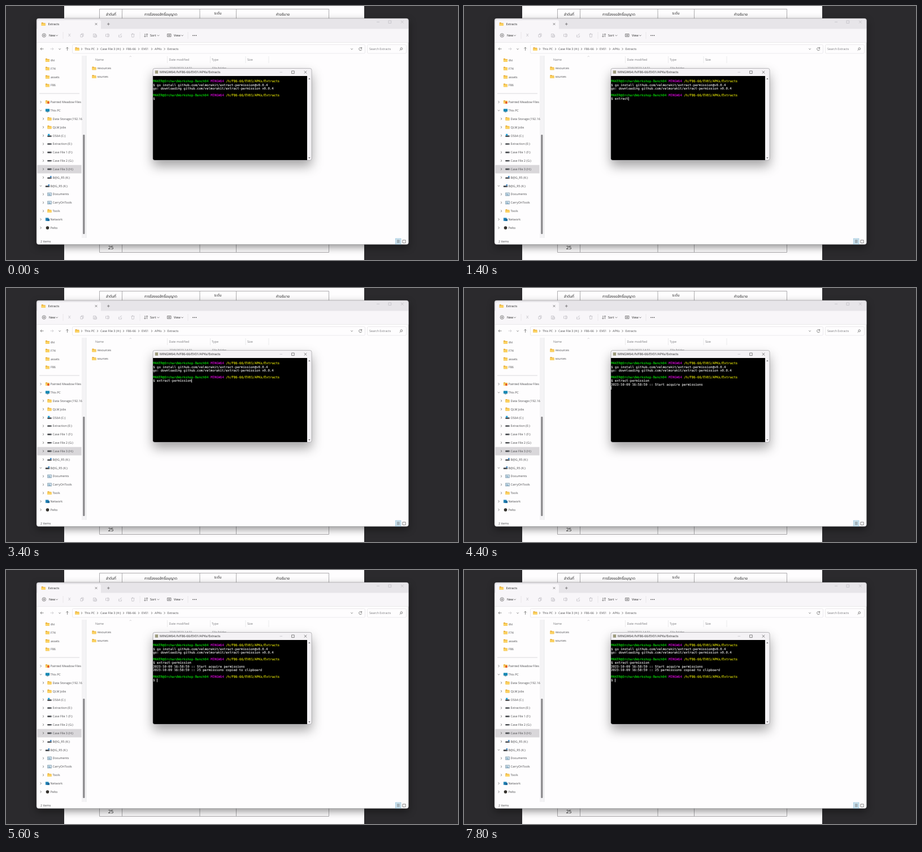
Animation, 800 px wide and 450 px high, one loop 8 s. Source, as an HTML page:

```html
<!DOCTYPE html>
<html lang="en">
<head>
<meta charset="utf-8">
<title>Terminal session</title>
<style>
  html, body { margin: 0; width: 100%; height: 100%; overflow: hidden; background: #2b2a2d; }
  svg { display: block; width: 800px; height: 450px; }
  text { font: 5.4px "Open Sans", "Noto Sans", sans-serif; fill: #4a4a4d; white-space: pre; text-rendering: geometricPrecision; }
  .soft { fill: #77777b; }
  .dark { fill: #222; }
  .title { font-size: 5.7px; }
  .thai { font: 6.4px "Noto Sans Thai", "Noto Sans", "DejaVu Sans", sans-serif; fill: #222; text-anchor: middle; }
  .number { font-size: 8.4px; }
  .term text { font: 5.648px "DejaVu Sans Mono", monospace; fill: currentColor; stroke: currentColor; stroke-width: .12; }
  .line { fill: none; stroke: #555; stroke-width: .7; }
  .faint { fill: none; stroke: #bcbbc0; stroke-width: .7; }
  .rule { fill: none; stroke: #e6e5e8; stroke-width: .8; }
  .table { fill: none; stroke: #98979a; stroke-width: .8; }
  .explorer { filter: drop-shadow(0 5px 7px rgba(0, 0, 0, .42)); }
  .console { filter: drop-shadow(0 10px 10px rgba(0, 0, 0, .36)); }
</style>
</head>
<body>
<svg viewBox="0 0 800 450">
  <defs>
    <g id="folder">
      <path d="M-3.6-2.4q0-.6.6-.6h2l.9.9h3q.6 0 .6.6V2.2q0 .6-.6.6H-3q-.6 0-.6-.6z" fill="#e6a92e"/>
      <rect x="-3.6" y="-1.3" width="7.2" height="4.1" rx=".6" fill="#fbd263"/>
    </g>
    <g id="drive">
      <rect x="-3.7" y="-1.2" width="7.4" height="2.6" rx=".6" fill="#4b4d51"/>
      <rect x="1.6" y="0" width="1.2" height=".7" fill="#b9c4c8"/>
    </g>
    <g id="usb">
      <use href="#drive" y=".8"/>
      <rect x="1" y="-2.6" width="2.6" height="2.4" fill="#3d86c4"/>
    </g>
    <g id="system">
      <use href="#drive" y=".9"/>
      <rect x="-3" y="-2.9" width="3.4" height="2.8" fill="#27a4d8"/>
    </g>
    <g id="pc">
      <rect x="-3.6" y="-2.8" width="7.2" height="4.8" rx=".5" fill="#1689b4"/>
      <path d="M-1.8 2.8h3.6" stroke="#3f6473" stroke-width=".9"/>
    </g>
    <g id="net">
      <rect x="-3.6" y="-2.8" width="5.6" height="5.4" fill="#2586b8"/>
      <rect x="-1" y="-1" width="4.6" height="3.8" fill="#1d6a9c"/>
    </g>
    <g id="docs">
      <rect x="-3.3" y="-2.5" width="6.600" height="5" fill="#dce9f1" stroke="#6f8ea2" stroke-width=".8"/>
      <path d="M-2 1.200h4M-2-.5h2.500" stroke="#4f87ab" stroke-width=".8"/>
    </g>
    <g id="synced">
      <use href="#folder"/>
      <circle cx="1.4" cy="1" r="2" fill="#e2562c"/>
    </g>
    <circle id="dot" r="2.8" fill="#35322d"/>
    <path id="right" class="line" d="M-1-1.8 1 0-1 1.8"/>
    <path id="down" class="line" d="M-1.7-.8 0 .9 1.7-.8"/>
  </defs>

  <rect width="800" height="450" fill="#2b2a2d"/>
  <rect x="103" width="531" height="450" fill="#fefdfe"/>
  <path class="table" d="M165.5 5.5H571.5M165.5 436.5H571.5M165.5 5.5V436.5M205.5 5.5V436.5M343 5.5V436.5M407.5 5.5V436.5M571.5 5.5V436.5"/>
  <text class="thai" x="186" y="16.500">ลำดับที่</text>
  <text class="thai" x="274" y="16.500">การร้องขอสิทธิ์อนุญาต</text>
  <text class="thai" x="375" y="14.500">ระดับ</text>
  <text class="thai" x="490" y="16.500">คำอธิบาย</text>
  <text class="thai number" x="185.5" y="430.5">25</text>

  <rect class="explorer" x="54" y="22" width="658.5" height="400.5" rx="4" fill="#fefdfe"/>
  <path d="M54 41V26q0-4 4-4H708.5q4 0 4 4V41z" fill="#e7e5e9"/>
  <path d="M56 41V28q0-3 3-3H165q3 0 3 3V41z" fill="#f8f6f9"/>
  <rect x="54" y="40.5" width="658.5" height="24" fill="#f8f6f9"/>
  <rect x="134" y="88" width="8" height="323" fill="#f4f3f5"/>
  <path class="rule" d="M54 64.5H712.5M101 46V58M237 46V58M322 46V58M142 88V411M285.5 89V101M361.5 89V101M424 89V101M465 89V101"/>
  <rect x="53.900" y="21.900" width="658.700" height="400.700" rx="4" fill="none" stroke="#77767a" stroke-opacity=".6" stroke-width=".8"/>
  <path class="faint" d="M656 28.300h5M677 26h4.600v4.600H677zM699 26l4.600 4.600m0-4.600L699 30.600"/>
  <g class="line">
    <path d="M157.700 30.200l3.600 3.600m0-3.600l-3.600 3.600M179 32h4.600m-2.300-2.300v4.600"/>
    <circle cx="67.300" cy="52" r="3.200"/>
    <path d="M65.600 52h3.400m-1.700-1.700v3.400"/>
    <path d="M246 49v6m-1.500-1.500L246 55l1.500-1.500M249.500 55v-6m-1.500 1.500L249.500 49l1.500 1.500"/>
    <path d="M285.500 49.500h6.500v4.800h-6.500zM287 51.200h3.500m-3.500 1.500h3.500"/>
    <path d="M66.500 76h-5.500m2.200-2.200L61 76l2.200 2.200M108.500 79v-5.800m-2.200 2.200l2.200-2.200 2.200 2.200"/>
    <path d="M629.600 75a2.600 2.600 0 1 0 .2 1.800m-.2-3.800v2.200h-2.200"/>
    <circle cx="699.800" cy="75.700" r="1.800"/><path d="M698.500 77l-1.900 1.900"/>
  </g>
  <path class="faint" d="M78.500 76h5.500m-2.200-2.200L84 76l-2.200 2.200M110.500 49l3.600 5m-3.600 0l3.600-5M132 50.500h3.500v4.500H132zM133.500 50.500V49h3.500v4.500h-1.500M154.500 49.500h4.500v5.500h-4.500zM156.500 51.500h4v3.500h-4zM176.500 50h6v4h-6zM180.500 48.500v7M199.500 51v4h5v-3M201.500 53q0-3.500 3.500-3.500M221.500 50h6m-5.200 0l.5 5.200h3.400l.5-5.200m-3.200 0v-1.200h1.200V50"/>
  <g class="dark"><circle cx="331" cy="52.300" r=".8"/><circle cx="333.800" cy="52.300" r=".8"/><circle cx="336.600" cy="52.300" r=".8"/></g>
  <rect class="rule" x="117.500" y="68.500" width="518" height="15.500" rx="2"/>
  <rect class="rule" x="639.500" y="68.500" width="69" height="15.500" rx="2"/>
  <path class="faint" d="M218.700 90l1.600-1.300 1.600 1.300"/>
  <rect x="55" y="281.700" width="78.500" height="14.800" fill="#d9d7da"/>
  <path class="rule" d="M59 155H130" style="stroke:#d0cfd2"/>
  <rect x="136.200" y="228" width="3.200" height="176" rx="1" fill="#89888b"/>
  <rect x="689.500" y="412" width="9.500" height="10" fill="#cfe5f1" stroke="#7fb4d0" stroke-width=".6"/>
  <path class="line" d="M691.800 415h5m-5 2h5m-5 2h5M702 414.800h5.200v5H702z"/>
  <g id="labels"></g>

  <rect class="console" x="260" y="110.500" width="281" height="163" rx="3" fill="#f4f2f5"/>
  <path d="M260 124H533V273H263q-3 0-3-3z"/>
  <rect x="260" y="110.500" width="281" height="162.800" rx="3" fill="none" stroke="#77767a" stroke-opacity=".6" stroke-width=".8"/>
  <rect x="263.800" y="114.300" width="5.400" height="5.400" fill="#9c9a7c"/>
  <text x="272" y="119.200" class="dark title">MINGW64:/h/F86-66/EV01/APKs/Extracts</text>
  <path class="faint" d="M484.500 117.300h4.600"/>
  <path class="line" d="M505.600 115h4.600v4.600h-4.600zM527.700 115l4.600 4.600m0-4.600l-4.600 4.600"/>
  <path d="M535.200 129.800l1.700-2 1.700 2zM535.200 268.200l1.700 2 1.700-2z" fill="#606064"/>
  <g class="term" id="term"></g>
  <rect id="cursor" width=".9" height="6.200" fill="#e6e6e6"/>
</svg>
<script>
const NS = "http://www.w3.org/2000/svg";
const labels = document.getElementById("labels");
const term = document.getElementById("term");
const cursor = document.getElementById("cursor");

function add(parent, tag, attrs, content = "") {
  const el = document.createElementNS(NS, tag);
  for (const key in attrs) el.setAttribute(key, attrs[key]);
  el.textContent = content;
  return parent.appendChild(el);
}
const icon = (id, x, y) => add(labels, "use", { href: "#" + id, x, y });
const label = (s, x, y, cls = "") => add(labels, "text", { x, y: y + 1.9, class: cls }, s);

// Explorer: tab, toolbar, address bar
icon("folder", 66.3, 32.3);
label("Extracts", 74.5, 32.3, "dark");
[["New", 76], ["Sort", 255], ["View", 297]].forEach(([s, x]) => label(s, x, 52.2, "dark"));
[90, 269.5, 312].forEach(x => icon("down", x, 52.2));
icon("down", 95, 76.2);
icon("down", 612, 76.2);
icon("folder", 126, 76.2);
[["This PC", 139], ["Case File 3 (H:)", 167], ["F86-66", 213], ["EV01", 240], ["APKs", 263], ["Extracts", 285.5]]
  .forEach(([s, x]) => { icon("right", x - 5, 76.2); label(s, x, 76.2); });
label("Search Extracts", 643, 76.5, "soft");

// File list
[["Name", 158], ["Date modified", 288.5], ["Type", 364], ["Size", 427]].forEach(([s, x]) => label(s, x, 95, "soft"));
["resources", "sources"].forEach((s, i) => {
  const y = 110.5 + i * 14.8;
  icon("folder", 156, y);
  label(s, 161.5, y);
  label("27/9/2023 14:31", 289, y, "soft");
  label("File folder", 365, y, "soft");
});
label("2 items", 61, 417.5);

// Sidebar: depth 0 has its arrow at the edge
["dsi", "F74", "assets", "F86"].forEach((s, i) => {
  icon("folder", 73.5, 96 + i * 14.85);
  label(s, 79, 96 + i * 14.85);
});
[
  ["Painted Meadow Files", "synced", 0], ["This PC", "pc", 0, 1],
  ["Data Storage (192.16", "folder", 1], ["QLM Jobs", "folder", 1],
  ["OS64 (C:)", "system", 1], ["Extraction (E:)", "drive", 1],
  ["Case File 1 (F:)", "drive", 1], ["Case File 2 (G:)", "drive", 1],
  ["Case File 3 (H:)", "drive", 1], ["B@G_R5 (K:)", "usb", 1],
  ["B@G_R5 (K:)", "usb", 0, 1], ["Documents", "docs", 1],
  ["CarryOnTools", "docs", 1], ["Tools", "folder", 1],
  ["Network", "net", 0], ["Pelto", "dot", 0]
].forEach(([s, pic, depth, open], i) => {
  const y = 170.2 + i * 14.85;
  icon(open ? "down" : "right", depth ? 66 : 61.5, y);
  icon(pic, depth ? 77 : 73.5, y);
  label(s, depth ? 82.5 : 78.5, y);
});

// Terminal
const colX = c => 260.2 + c * 3.4;
const rowY = r => 135.4 + r * 6.2;
const print = (r, s, c = 0, color = "#e6e6e6") =>
  add(term, "text", { x: colX(c), y: rowY(r), style: "color:" + color }, s);

function prompt(r) {
  return [
    print(r, "MAKER@OrchardWorkshop-Bench04", 0, "#08d808"),
    print(r, "MINGW64", 30, "#cc08cc"),
    print(r, "/h/F86-66/EV01/APKs/Extracts", 38, "#dcdc08"),
    print(r + 1, "$")
  ];
}
prompt(0);
print(1, "go install github.com/velmorakit/extract-permission@v0.0.4", 2);
print(2, "go: downloading github.com/velmorakit/extract-permission v0.0.4");
prompt(4);
const typed = print(5, "", 2);
const started = [print(6, "2023-10-09 16:58:59 :: Start acquire permissions")];
const finished = [print(7, "2023-10-09 16:58:59 :: 25 permissions copied to clipboard"), ...prompt(9)];

// [time, text at the prompt]
const keys = [
  [0, ""], [200, "e"], [400, "ext"], [600, "extra"], [800, "extract"],
  [1000, "extractpe"], [1200, "extractp"], [1400, "extract"], [1800, "extract-"],
  [2000, "extract-p"], [2200, "extract-pe"], [2400, "extract-per"], [2600, "extract-perm"],
  [2800, "extract-permis"], [3000, "extract-permiss"], [3200, "extract-permissio"],
  [3400, "extract-permission"]
];
const show = (els, on) => els.forEach(el => el.style.display = on ? "" : "none");

function cursorPlace(t, length) {
  if (t < 4200) return [2 + length, 5];
  if (t < 4400) return [0, 6];
  if (t < 4600) return [0, 7];
  return [2, 10];
}
function cursorOn(t) {
  if (t < 200 || (t >= 3800 && t < 4200)) return false;
  return t < 5000 || Math.floor((t - 4950) / 550) % 2 === 1;
}

function draw(now) {
  const t = Math.floor(now % 8000 / 200) * 200;
  const text = keys.filter(k => k[0] <= t).pop()[1];
  typed.textContent = text;
  show(started, t >= 4400);
  show(finished, t >= 4600);
  const [col, row] = cursorPlace(t, text.length);
  cursor.setAttribute("x", colX(col));
  cursor.setAttribute("y", rowY(row) - 5);
  show([cursor], cursorOn(t));
  requestAnimationFrame(draw);
}
draw(performance.now());
</script>
</body>
</html>
```
